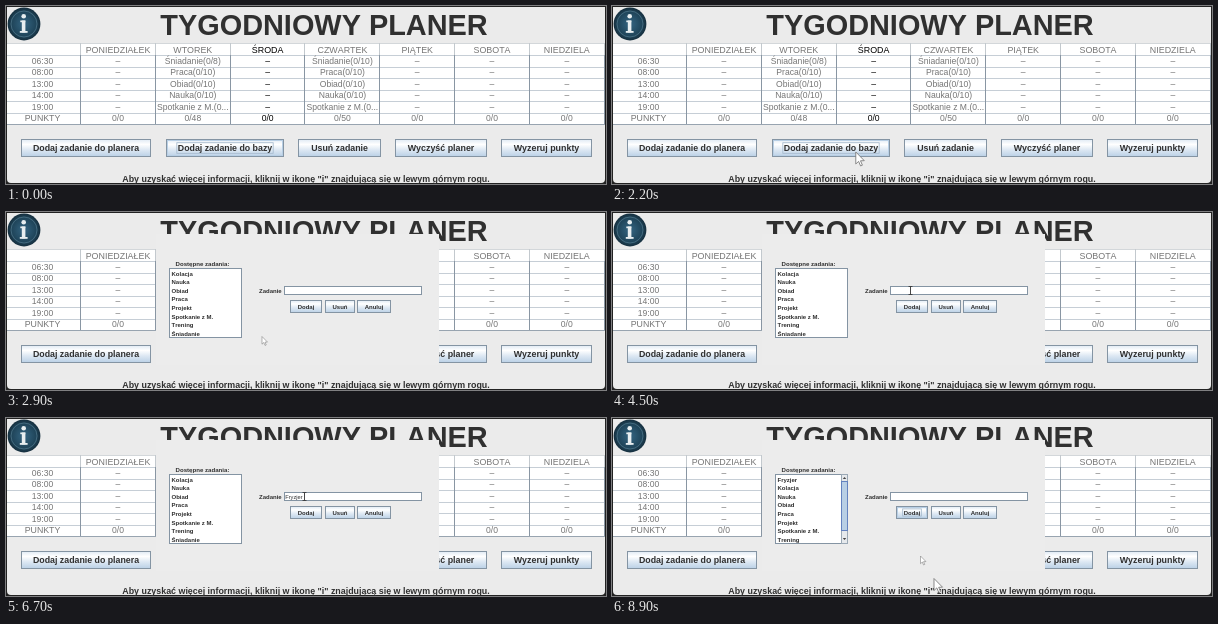
Animation of 600 by 178 pixels, one loop 9 s. Source, as an HTML page with a canvas:

```html
<!DOCTYPE html>
<html lang="pl">
<head>
<meta charset="utf-8">
<title>Tygodniowy planer</title>
<style>
html, body { margin: 0; width: 100%; height: 100%; overflow: hidden; background: #ebebeb; }
canvas { display: block; width: 600px; height: 178px; }
</style>
</head>
<body>
<canvas id="stage"></canvas>
<script>
const LOOP = 9000, W = 600, H = 178;
const PANEL = '#ebebeb', INK = '#303030', EDGE = '#8494a3';
const canvas = document.getElementById('stage');
const ctx = canvas.getContext('2d');
const ratio = window.devicePixelRatio || 1;
canvas.width = W * ratio;
canvas.height = H * ratio;

const OPEN = 2850, ADD = 7600;
const DAYS = ['PONIEDZIAŁEK', 'WTOREK', 'ŚRODA', 'CZWARTEK', 'PIĄTEK', 'SOBOTA', 'NIEDZIELA'];
const HOURS = ['06:30', '08:00', '13:00', '14:00', '19:00'];
const PLANS = {
  1: ['Śniadanie(0/8)', 'Praca(0/10)', 'Obiad(0/10)', 'Nauka(0/10)', 'Spotkanie z M.(0...'],
  3: ['Śniadanie(0/10)', 'Praca(0/10)', 'Obiad(0/10)', 'Nauka(0/10)', 'Spotkanie z M.(0...']
};
const POINTS = { 1: '0/48', 3: '0/50' };
const TASKS = ['Kolacja', 'Nauka', 'Obiad', 'Praca', 'Projekt', 'Spotkanie z M.', 'Trening', 'Śniadanie'];
const NEW_TASK = 'Fryzjer';
const KEY_TIMES = [5100, 5500, 5700, 5800, 6000, 6200, 6300];

// Pointer paths: [time, x, y]
const MAIN_PATH = [[1100, 271, 174], [1500, 246.5, 154.5], [2000, 245, 150], [2500, 242, 140], [2850, 242, 139.5]];
const DIALOG_PATH = [[3100, 256, 124.5], [3400, 276, 103], [3700, 298.5, 78.5],
  [6800, 298.5, 78.5], [7000, 302, 86], [7300, 306, 95], [8600, 306, 95], [8800, 308, 128], [8900, 308.5, 138]];

function rect(x, y, w, h, color) {
  ctx.fillStyle = color;
  ctx.fillRect(x, y, w, h);
}

function disc(x, y, r, color) {
  ctx.fillStyle = color;
  ctx.beginPath();
  ctx.arc(x, y, r, 0, Math.PI * 2);
  ctx.fill();
}

function frame(x, y, w, h, color = EDGE) {
  ctx.strokeStyle = color;
  ctx.lineWidth = 1;
  ctx.strokeRect(x + .5, y + .5, w - 1, h - 1);
}

function text(str, x, y, size, { bold = false, align = 'center', color = INK } = {}) {
  ctx.font = `${bold ? 'bold ' : ''}${size}px "Liberation Sans", Arial, sans-serif`;
  ctx.textAlign = align;
  ctx.fillStyle = color;
  ctx.fillText(str, x, y);
}

function button(label, x, y, w, h, size, focused) {
  const shade = ctx.createLinearGradient(0, y, 0, y + h);
  shade.addColorStop(0, '#dde8f3');
  shade.addColorStop(.3, '#ffffff');
  shade.addColorStop(.6, '#dde8f3');
  shade.addColorStop(1, '#b8cfe5');
  rect(x, y, w, h, shade);
  if (focused) frame(x + 1, y + 1, w - 2, h - 2, '#b8cfe5');
  frame(x, y, w, h);
  const mid = y + h / 2;
  text(label, x + w / 2, mid + size * .36, size, { bold: true });
  if (focused) {
    const half = ctx.measureText(label).width / 2 + 1;
    ctx.strokeStyle = '#a3b8cc';
    ctx.lineWidth = .8;
    ctx.strokeRect(x + w / 2 - half, mid - size * .6, half * 2, size * 1.2);
  }
}

function icon() {
  const fill = ctx.createRadialGradient(18, 18, 3, 18, 18, 16.4);
  fill.addColorStop(0, '#2f5d78');
  fill.addColorStop(.7, '#1f4459');
  fill.addColorStop(1, '#152e3d');
  disc(18, 18, 16.4, fill);
  ctx.strokeStyle = '#4d7488';
  ctx.lineWidth = .8;
  ctx.beginPath();
  ctx.arc(18, 18, 13, 0, Math.PI * 2);
  ctx.stroke();
  const white = '#e8eef0';
  disc(17.7, 10.2, 2.3, white);
  rect(14.3, 14.5, 5, 1.7, white);
  rect(15.8, 14.5, 3.6, 12, white);
  rect(13.8, 25, 7.8, 1.8, white);
}

function table() {
  const rowH = 11.45, top = 38, bottom = 118, dayW = 74.8;
  const lineX = col => Math.round(col * dayW - .8);
  rect(1, 37, 598, 81, '#ffffff');
  for (let r = 1; r <= 7; r++) rect(1, Math.round(top + r * rowH), 598, 1, r === 7 ? '#98a4b0' : '#c6ced6');
  rect(1, 37, 598, 1, '#d3d7da');
  for (let c = 1; c <= 8; c++) {
    rect(lineX(c), 37, 1, 12, '#c3c9ce');
    rect(lineX(c), 49, 1, bottom - 49, '#8996a3');
  }

  const baseline = row => 46.5 + row * rowH;
  const gray = { color: '#757575' };
  HOURS.forEach((hour, r) => text(hour, 36.5, baseline(r + 1), 8.6, gray));
  text('PUNKTY', 36.5, baseline(6), 8.8, gray);
  DAYS.forEach((day, d) => {
    const x = 112 + d * dayW;
    const style = d === 2 ? { color: '#000000' } : gray;
    text(day, x, baseline(0), 8.9, style);
    HOURS.forEach((_, r) => text(PLANS[d] ? PLANS[d][r] : '–', x, baseline(r + 1), 8.6, style));
    text(POINTS[d] || '0/0', x, baseline(6), 8.6, style);
  });
}

function mainWindow() {
  rect(0, 0, W, H, '#222222');
  ctx.fillStyle = PANEL;
  ctx.beginPath();
  ctx.roundRect(1, 1, W - 2, H - 2, [0, 0, 4, 4]);
  ctx.fill();
  text('TYGODNIOWY PLANER', 318, 28.5, 28.9, { bold: true });
  icon();
  table();
  button('Dodaj zadanie do planera', 15, 133, 130, 18, 8.8);
  button('Dodaj zadanie do bazy', 160, 133, 118, 18, 8.8, true);
  button('Usuń zadanie', 292, 133, 83, 18, 8.8);
  button('Wyczyść planer', 389, 133, 92, 18, 8.9);
  button('Wyzeruj punkty', 495, 133, 91, 18, 8.9);
  text('Aby uzyskać więcej informacji, kliknij w ikonę "i" znajdującą się w lewym górnym rogu.',
    300, 176, 8.9, { bold: true });
}

function arrowHead(x, y, dir) {
  ctx.fillStyle = '#444';
  ctx.beginPath();
  ctx.moveTo(x - 1.7, y);
  ctx.lineTo(x + 1.7, y);
  ctx.lineTo(x, y + 2 * dir);
  ctx.fill();
}

function scrollbar() {
  rect(229, 57, 6, 68, '#e6e9ec');
  frame(229, 56, 7, 70, '#9aa8b5');
  rect(230, 63, 5, 50, '#b8cfe5');
  frame(229, 63, 7, 50, '#6382bf');
  arrowHead(232.5, 61, -1);
  arrowHead(232.5, 120, 1);
}

function taskList(added) {
  text('Dostępne zadania:', 196.5, 54, 6.1, { bold: true });
  rect(163, 56, 73, 70, '#ffffff');
  frame(163, 56, 73, 70);
  const items = added ? [NEW_TASK, ...TASKS].slice(0, 8) : TASKS;
  items.forEach((item, i) => text(item, 165.5, 63.6 + i * 8.58, 6, { bold: true, align: 'left' }));
  if (added) scrollbar();
}

function caretVisible(t, typedCount) {
  if (typedCount === 0) return t < 4500 && Math.floor((t - 3000) / 500) % 2 === 0;
  const restart = typedCount === KEY_TIMES.length ? 6200 : KEY_TIMES[typedCount - 1];
  return Math.floor((t - restart) / 500) % 2 === 0;
}

function taskField(t) {
  text('Zadanie', 253, 81, 6, { bold: true, align: 'left' });
  rect(278, 74, 138, 9, '#ffffff');
  frame(278, 74, 138, 9);
  if (t >= ADD) return;
  const typed = NEW_TASK.slice(0, KEY_TIMES.filter(k => k <= t).length);
  text(typed, 279.2, 80.8, 5.7, { align: 'left' });
  if (caretVisible(t, typed.length))
    rect(279 + ctx.measureText(typed).width, 75.5, .7, 6.5, INK);
}

function dialog(t) {
  const added = t >= ADD;
  rect(150, 22, 283, 131, '#ececec');
  taskList(added);
  taskField(t);
  button('Dodaj', 284, 88, 32, 13, 6, added);
  button('Usuń', 319, 88, 30, 13, 6);
  button('Anuluj', 351, 88, 34, 13, 6);
}

function along(path, t) {
  const next = path.findIndex(p => p[0] > t);
  if (next === 0) return path[0].slice(1);
  if (next < 0) return path[path.length - 1].slice(1);
  const [t0, x0, y0] = path[next - 1], [t1, x1, y1] = path[next];
  const k = (t - t0) / (t1 - t0);
  return [x0 + (x1 - x0) * k, y0 + (y1 - y0) * k];
}

function pointer(x, y, scale) {
  ctx.save();
  ctx.translate(x, y);
  ctx.scale(scale, scale);
  ctx.beginPath();
  [[0, 0], [0, 12], [2.8, 9.4], [4.8, 14], [6.6, 13.2], [4.7, 8.8], [8.5, 8.7]]
    .forEach(p => ctx.lineTo(...p));
  ctx.closePath();
  ctx.fillStyle = '#ffffff';
  ctx.fill();
  ctx.strokeStyle = '#777';
  ctx.lineWidth = .85;
  ctx.stroke();
  ctx.restore();
}

function textPointer(x, y) {
  rect(x - .4, y - 4, .9, 8, '#333');
  rect(x - 2, y - 4.3, 4, .8, '#333');
  rect(x - 2, y + 3.5, 4, .8, '#333');
}

function pointers(t) {
  if (t >= 1100 && t < OPEN) pointer(...along(MAIN_PATH, t), 1);
  if (t >= OPEN) {
    const [x, y] = along(DIALOG_PATH, t);
    const overField = y > 74 && y < 83;
    if (overField) textPointer(x, y);
    else pointer(x, y, .64);
  }
  if (t >= 8850) pointer(322, 160.5, 1);
}

function draw(t) {
  ctx.setTransform(ratio, 0, 0, ratio, 0, 0);
  ctx.fontKerning = 'none';
  mainWindow();
  if (t >= OPEN) dialog(t);
  pointers(t);
}

const start = performance.now();
function tick() {
  draw((performance.now() - start) % LOOP);
  requestAnimationFrame(tick);
}
tick();
</script>
</body>
</html>
```
